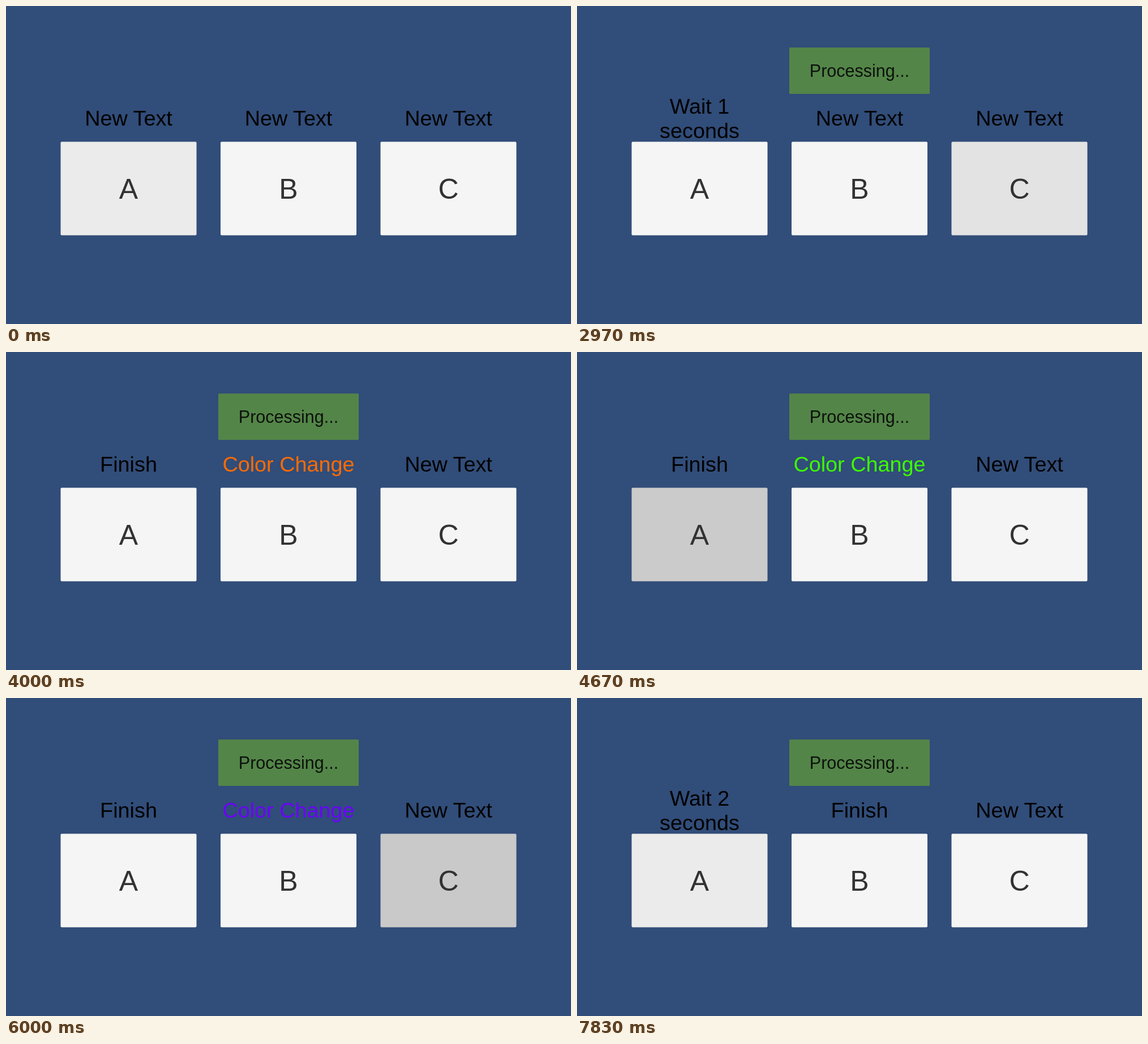
Write an HTML page that moves like this. It is 998 by 561 pixels and loops after 8 s.

```html
<!DOCTYPE html>
<html lang="en">
<head>
<meta charset="utf-8">
<title>Task queue demo</title>
<style>
  html, body { margin: 0; width: 100%; height: 100%; overflow: hidden; background: #314d79; }
  svg { display: block; width: 100vw; height: 100vh; }
  text { font-family: "Liberation Sans", Arial, sans-serif; text-anchor: middle; white-space: pre; }
  .label { font-size: 37.8px; }
  .letter { font-size: 50px; fill: #323232; }
  .status { font-size: 30.5px; fill: #0d120c; }
</style>
</head>
<body>
<svg id="stage" viewBox="0 0 998 561">
  <g id="status">
    <rect x="375" y="73.3" width="248" height="81.7" rx="1.5" fill="#538548"/>
    <text class="status" x="499" y="125">Processing...</text>
  </g>
</svg>
<script>
const LOOP = 8000, FADE = 100;
const NORMAL = 245, HOVER = 235, PRESSED = 201;
const HUE_START = 3790, HUE_RATE = 0.12;

// Button shade changes: [start time, shade to fade to]
const shades = [
  [[0, HOVER], [475, PRESSED], [580, NORMAL], [4540, HOVER], [4575, PRESSED],
   [4770, NORMAL], [6830, HOVER]],
  [[0, NORMAL], [1345, HOVER], [1495, PRESSED], [2340, NORMAL], [4150, HOVER],
   [4380, NORMAL], [5100, HOVER], [5290, PRESSED], [5470, NORMAL], [6430, HOVER],
   [6620, NORMAL]],
  [[0, NORMAL], [2750, HOVER], [2945, PRESSED], [3100, NORMAL], [3305, PRESSED],
   [3480, NORMAL], [5740, HOVER], [5890, PRESSED], [6080, NORMAL]]
];

// Label changes: [time, text]
const labels = [
  [[0, "New Text"], [598, "Wait 3\nseconds"], [1598, "Wait 2\nseconds"],
   [2598, "Wait 1\nseconds"], [3598, "Finish"], [6828, "Wait 3\nseconds"],
   [7828, "Wait 2\nseconds"]],
  [[0, "New Text"], [3768, "Color Change"], [6796, "Finish"]],
  [[0, "New Text"]]
];

const busy = [[598, 3598], [3768, 6796], [6828, LOOP]];

const stage = document.getElementById("stage");
const status = document.getElementById("status");

function add(tag, attrs, text = "") {
  const node = document.createElementNS("http://www.w3.org/2000/svg", tag);
  for (const key in attrs) node.setAttribute(key, attrs[key]);
  node.textContent = text;
  return stage.appendChild(node);
}

const cards = ["A", "B", "C"].map((letter, i) => {
  const x = 216.5 + i * 282.5;
  const box = add("rect", { x: x - 120, y: 239.5, width: 240, height: 165, rx: 2 });
  add("text", { class: "letter", x, y: 340 }, letter);
  const lines = [0, 1].map(() => add("text", { class: "label", x }));
  return { box, lines };
});

function shadeAt(steps, t) {
  let value = steps[0][1];
  steps.forEach(([start, target], i) => {
    if (t < start || i === 0) return;
    const end = i + 1 < steps.length ? Math.min(t, steps[i + 1][0]) : t;
    value += (target - value) * Math.min(1, (end - start) / FADE);
  });
  return Math.round(value);
}

const textAt = (steps, t) => steps.filter(([start]) => start <= t).pop()[1];

function setLabel(lines, text, color) {
  const parts = text.split("\n");
  const top = parts.length > 1 ? 189.7 : 211;
  lines.forEach((line, i) => {
    const value = parts[i] || "";
    if (line.textContent !== value) line.textContent = value;
    line.setAttribute("y", top + i * 43.3);
    line.setAttribute("fill", color);
  });
}

function draw(t) {
  cards.forEach(({ box, lines }, i) => {
    const s = shadeAt(shades[i], t);
    box.setAttribute("fill", `rgb(${s},${s},${s})`);
    const text = textAt(labels[i], t);
    const hue = Math.max(0, t - HUE_START) * HUE_RATE;
    setLabel(lines, text, text === "Color Change" ? `hsl(${hue},100%,50%)` : "#000");
  });
  const on = busy.some(([from, to]) => t >= from && t < to);
  status.setAttribute("visibility", on ? "visible" : "hidden");
}

let origin = null;
function tick(now) {
  if (origin === null) origin = now;
  draw((now - origin) % LOOP);
  requestAnimationFrame(tick);
}
draw(0);
requestAnimationFrame(tick);
</script>
</body>
</html>
```
